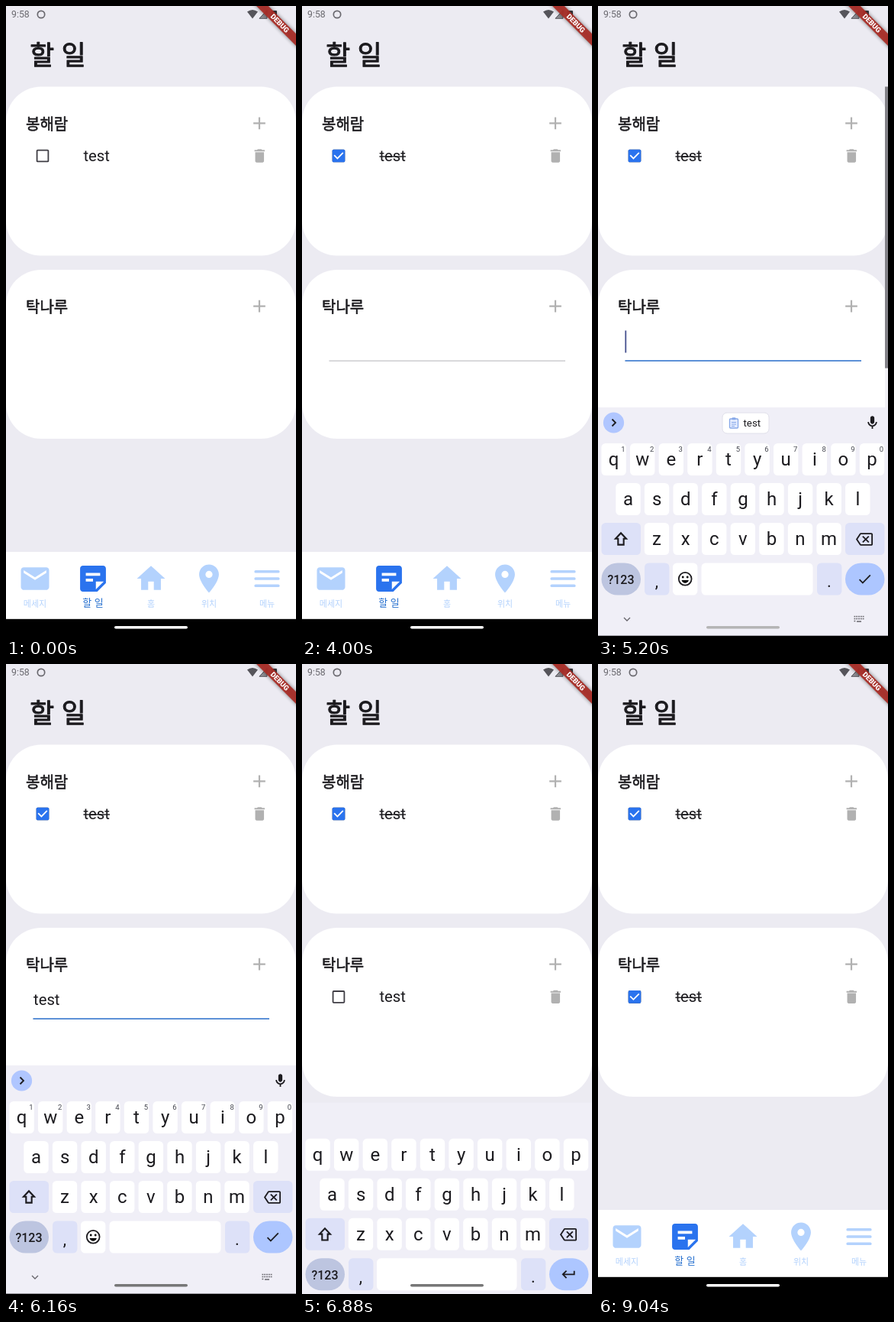
Write an HTML page that moves like this. It is 380 px wide and 824 px high and loops after 9.2 s.

```html
<!DOCTYPE html>
<html lang="ko">
<head>
<meta charset="utf-8">
<title>할 일</title>
<style>
  html, body { margin: 0; width: 100%; height: 100%; overflow: hidden; background: #ecebf2; }
  svg { display: block; width: 100%; height: 100%; }
  text { font-family: Roboto, sans-serif; fill: #1c1b1f; white-space: pre; }
  .ko { font-family: "Noto Sans CJK KR", "Noto Sans CJK", sans-serif; }
  .bold { stroke: #1c1b1f; stroke-width: .03em; stroke-linejoin: round; }
  .item { font-size: 20.3px; }
  .mid { text-anchor: middle; }
  .key { font-size: 24px; text-anchor: middle; }
  .hint { font-size: 9.5px; text-anchor: middle; fill: #44464f; }
</style>
</head>
<body>
<svg id="stage" viewBox="0 0 380 824"></svg>
<script>
const LOOP = 9200;
const CARD_STEP = 239.4;
const BLUE = '#2a73ee', PALE = '#b3d2fd', GREY = '#b1b1b1', INK = '#1c1b1f', STATUS = '#6a696f';

const ICONS = {
  mail: 'M20 4H4c-1.1 0-1.99.9-1.99 2L2 18c0 1.1.9 2 2 2h16c1.1 0 2-.9 2-2V6c0-1.1-.9-2-2-2zm0 4l-8 5-8-5V6l8 5 8-5v2z',
  note: 'M19 3H4.99C3.89 3 3 3.9 3 5l.01 14c0 1.1.89 2 1.99 2h10l6-6V5c0-1.1-.9-2-2-2zM7 8h10v2H7V8zm5 6H7v-2h5v2zm2 5.5V14h5.5L14 19.5z',
  home: 'M10 20v-6h4v6h5v-8h3L12 3 2 12h3v8z',
  place: 'M12 2C8.13 2 5 5.13 5 9c0 5.25 7 13 7 13s7-7.75 7-13c0-3.87-3.13-7-7-7zm0 9.5a2.5 2.5 0 0 1 0-5 2.5 2.5 0 0 1 0 5z',
  menu: 'M4 18h16a1 1 0 0 0 0-2H4a1 1 0 0 0 0 2zm0-5h16a1 1 0 0 0 0-2H4a1 1 0 0 0 0 2zM4 6a1 1 0 0 0 0 2h16a1 1 0 0 0 0-2z',
  add: 'M19 13h-6v6h-2v-6H5v-2h6V5h2v6h6v2z',
  trash: 'M6 19c0 1.1.9 2 2 2h8c1.1 0 2-.9 2-2V7H6v12zM19 4h-3.5l-1-1h-5l-1 1H5v2h14V4z',
  erase: 'M22 3H7c-.69 0-1.23.35-1.59.88L0 12l5.41 8.11c.36.53.9.89 1.59.89h15c1.1 0 2-.9 2-2V5c0-1.1-.9-2-2-2zm0 16H7.07L2.4 12l4.66-7H22v14zm-11.59-2L14 13.41 17.59 17 19 15.59 15.41 12 19 8.41 17.59 7 14 10.59 10.41 7 9 8.41 12.59 12 9 15.59z',
  enter: 'M19 7v4H5.83l3.58-3.59L8 6l-6 6 6 6 1.41-1.41L5.83 13H21V7z',
  done: 'M9 16.17L4.83 12l-1.42 1.41L9 19 21 7l-1.41-1.41z',
  mic: 'M12 14c1.66 0 3-1.34 3-3V5c0-1.66-1.34-3-3-3S9 3.34 9 5v6c0 1.66 1.34 3 3 3zm5-3c0 2.76-2.24 5-5 5s-5-2.24-5-5H5c0 3.53 2.61 6.43 6 6.92V21h2v-3.08c3.39-.49 6-3.39 6-6.92h-2z',
  shift: 'M12 3L3 12.5h4.5V20h9v-7.5H21zm0 2.9l4.4 4.6h-1.9V18h-5v-7.5H7.6z'
};

const icon = (name, x, y, scale, fill = INK) =>
  `<path d="${ICONS[name]}" fill="${fill}" transform="translate(${x} ${y}) scale(${scale}) translate(-12 -12)"/>`;
const rect = (x, y, w, h, fill, r = 0, extra = '') =>
  `<rect x="${x}" y="${y}" width="${w}" height="${h}" rx="${r}" fill="${fill}" ${extra}/>`;
const text = (str, x, y, cls, size, fill) =>
  `<text x="${x}" y="${y}" class="${cls}" style="${size ? `font-size:${size}px;` : ''}${fill ? `fill:${fill}` : ''}">${str}</text>`;
const line = (d, color, width, extra = '') =>
  `<path d="${d}" fill="none" stroke="${color}" stroke-width="${width}" ${extra}/>`;

const card = (name, i) => `<g transform="translate(0 ${i * CARD_STEP})">
  ${rect(0, 105.5, 380, 221, '#fff', 46)}
  ${text(name, 26, 161.6, 'ko bold', 20)}
  ${icon('add', 332, 153.3, 1.12, GREY)}
  <g id="row${i}">
    <g transform="translate(39.7 187.7)">
      ${rect(.9, .9, 14.8, 14.8, 'none', 1, 'stroke="#3f3d44" stroke-width="1.8"')}
      <g id="fill${i}">${rect(0, 0, 16.6, 16.6, BLUE, 1.6)}</g>
      ${line('M2.5 7.5L6.7 11.7L14.1 4.2', '#fff', 1.8, `id="tick${i}" pathLength="1"`)}
    </g>
    ${text('test', 101.4, 203, 'item')}
    ${rect(101.4, 196.2, 34.6, 1.4, INK, 0, `id="strike${i}"`)}
    ${icon('trash', 332.3, 196, .96, GREY)}
  </g>
</g>`;

const statusBar = `
  ${text('9:58', 7, 15.4, '', 12.3, STATUS)}
  <circle cx="46" cy="11" r="4.7" fill="none" stroke="${STATUS}" stroke-width="1.7"/>
  <path d="M323 16.5L316 7.6Q323 2.6 330 7.6Z" fill="#55545a"/>
  <path d="M332 16.3L342 5.6V16.3Z" fill="#8f8e94" stroke="#55545a"/>
  ${rect(347.5, 6, 7.5, 11, '#3b3b40', 1)}
  <g transform="translate(380 0) rotate(45)">
    ${rect(-60, 25.6, 120, 11.1, '#000', 0, 'opacity=".5" filter="url(#blur)"')}
    ${rect(-60, 25.6, 120, 11.1, '#ab2d27', 0, 'opacity=".92"')}
    <text x="1" y="34.2" class="mid" style="font-size:9.4px;font-weight:900;fill:#fff">DEBUG</text>
  </g>`;

const tabs = [['mail', '메세지'], ['note', '할 일'], ['home', '홈'], ['place', '위치'], ['menu', '메뉴']];
const navBar = rect(0, 714, 380, 88, '#fff') + rect(0, 801.8, 380, 22.2, '#000') +
  tabs.map(([name, label], i) => {
    const x = 38 + 76 * i, active = i === 1;
    return icon(name, x, 749, active ? 1.88 : 1.85, active ? BLUE : PALE) +
      text(label, x, active ? 784.8 : 785.6, 'ko mid', active ? 13 : 11, active ? '#2670cf' : PALE);
  }).join('');

const FUNC = '#dde1f8';
const PITCH = 37.6;
const letters = (row, firstX, top) => [...row].map((ch, i) => {
  const x = firstX + i * PITCH;
  return rect(x - 16.2, top, 32.4, 42, '#fff', 5.5) + text(ch, x, top + 29, 'key');
}).join('');
const hints = [...'1234567890'].map((d, i) => text(d, 33 + i * PITCH, 583, 'hint')).join('');

const keyboard = `<g id="keyboard">
  ${rect(0, 525, 380, 300, '#f0eff7')}
  <g id="toolbar">
    <circle cx="20.5" cy="545" r="13.6" fill="#b0c6ff"/>
    ${line('M18.5 540.5L23 545L18.5 549.5', INK, 1.8)}
    <g id="chip">
      ${rect(163, 532, 61, 27, '#fff', 6, 'stroke="#e0e0ea"')}
      ${rect(172.5, 540, 11, 12, '#e4ecff', 1, 'stroke="#86a8e8" stroke-width="1.3"')}
      ${rect(175.5, 538.3, 5, 3, '#86a8e8', 1)}
      ${line('M175 544.5h6M175 547h6M175 549.5h4', '#86a8e8', 1)}
      ${text('test', 190.5, 550.2, '', 13.3)}
    </g>
    ${icon('mic', 359.5, 545, .88)}
  </g>
  ${letters('qwertyuiop', 20.6, 572)}
  ${letters('asdfghjkl', 39.5, 624)}
  ${letters('zxcvbnm', 77, 676)}
  ${rect(4.5, 676, 51.5, 42, FUNC, 5.5)}${icon('shift', 30, 697.3, 1.05)}
  ${rect(324, 676, 51.5, 42, FUNC, 5.5)}${icon('erase', 349, 697.5, .92)}
  ${rect(4.5, 728.5, 51.5, 42, '#bdc5e0', 21)}
  <text x="30" y="756" class="mid" style="font-size:16px;font-weight:500">?123</text>
  ${rect(61, 728.5, 32.4, 42, FUNC, 5.5)}${text(',', 77, 760, 'key', 22)}
  ${rect(287, 728.5, 32.4, 42, FUNC, 5.5)}${text('.', 303, 760, 'key', 22)}
  ${rect(324, 728.5, 51.5, 42, '#adc6ff', 21)}
  <g id="editing">
    ${hints}
    ${rect(98, 728.5, 32.4, 42, '#fff', 5.5)}${rect(135.5, 728.5, 146, 42, '#fff', 5.5)}
    <circle cx="114.2" cy="749.3" r="8.4" fill="none" stroke="${INK}" stroke-width="1.8"/>
    <circle cx="111.2" cy="747" r="1.4"/><circle cx="117.2" cy="747" r="1.4"/>
    <path d="M109.5 751h9.4q-1.5 3.8-4.7 3.8t-4.7-3.8z"/>
    ${icon('done', 349.5, 749.5, .88)}
  </g>
  <g id="plain">
    ${rect(98, 728.5, 183.5, 42, '#fff', 5.5)}${icon('enter', 349.5, 749.5, .9)}
  </g>
  ${line('M34 800l4 4l4-4', '#66656b', 1.3)}
  ${line('M335.5 798.5h13M335.5 801.5h13M335.5 804.5h2', '#66656b', 1.7, 'stroke-dasharray="1.8 1"')}
  ${line('M339 805h6', '#66656b', 1.5)}
  ${rect(0, 823, 380, 1, '#98979d')}
</g>`;

document.getElementById('stage').innerHTML = `
  <defs><filter id="blur" x="-20%" y="-100%" width="140%" height="300%"><feGaussianBlur stdDeviation="2.4"/></filter></defs>
  ${rect(0, 0, 380, 824, '#ecebf2')}
  ${text('할 일', 31.2, 77.3, 'ko bold', 34.7)}
  ${card('봉해람', 0)}${card('탁나루', 1)}
  <g id="field">
    ${rect(35.5, 463.6, 309.5, 1, '#b4b3b8')}
    ${rect(35.5, 463.2, 309.5, 1.6, '#3f7fd6', 0, 'id="focusLine"')}
    ${text('<tspan id="typed">test</tspan>', 36, 446, 'item')}
    ${rect(35.4, 424.5, 1.8, 29, '#46518f', 0, 'id="cursor"')}
  </g>
  <g id="scrollbar">
    ${rect(376, 105.5, 4, 609, '#f1f0f5')}
    ${rect(376, 105.5, 4, 369, '#828187', 0, 'id="thumb"')}
  </g>
  ${statusBar}${navBar}${keyboard}
  ${rect(142, 811, 96, 3.6, '#fff', 1.8, 'id="pill"')}`;

const el = {};
document.querySelectorAll('[id]').forEach(node => el[node.id] = node);
const show = (node, visible) => node.style.display = visible ? '' : 'none';
const ramp = (t, from, to) => Math.min(1, Math.max(0, (t - from) / (to - from)));
const easeOut = p => 1 - (1 - p) ** 3;

const CHECKED = [1355, 8555];
const FIELD_SHOWN = 3350, FOCUSED = 4150, PASTED = 5650, SUBMITTED = 6550;

function drawCheck(i, t) {
  const p = ramp(t, CHECKED[i], CHECKED[i] + 200);
  const stroke = ramp(p, .5, 1);
  el['fill' + i].style.opacity = ramp(p, 0, .5);
  show(el['tick' + i], stroke > 0);
  el['tick' + i].setAttribute('stroke-dasharray', `${stroke} 2`);
  show(el['strike' + i], p > 0);
}

function draw(t) {
  drawCheck(0, t);
  drawCheck(1, t);
  show(el.row1, t >= SUBMITTED);

  const pasted = t >= PASTED;
  show(el.field, t >= FIELD_SHOWN && t < SUBMITTED);
  el.focusLine.style.opacity = ramp(t, FOCUSED, FOCUSED + 200);
  show(el.typed, pasted);
  const blink = (t - (pasted ? PASTED : FOCUSED)) % 1000;
  show(el.cursor, t >= FOCUSED && blink < 500);
  el.cursor.setAttribute('x', pasted ? 70 : 35.4);

  const raised = easeOut(ramp(t, 4520, 4880)) - ramp(t, 6760, 7060) ** 2;
  const shift = 300 * (1 - raised);
  el.keyboard.setAttribute('transform', `translate(0 ${shift})`);
  show(el.keyboard, raised > 0);
  const editing = t < 6640;
  show(el.editing, editing);
  show(el.plain, !editing);
  show(el.toolbar, editing);
  show(el.chip, !pasted);

  const viewport = 419.5 + shift, content = 478;
  show(el.scrollbar, t < 6000 && viewport < content);
  el.scrollbar.style.opacity = 1 - ramp(t, 5500, 5800);
  el.thumb.setAttribute('height', viewport * viewport / content);

  const tone = Math.round(255 - 74 * ramp(t, 4700, 5000) - 62 * ramp(t, 5250, 5550) + 136 * ramp(t, 7000, 7600));
  el.pill.setAttribute('fill', `rgb(${tone},${tone},${tone})`);
}

const start = performance.now();
function tick() {
  draw((performance.now() - start) % LOOP);
  requestAnimationFrame(tick);
}
tick();
</script>
</body>
</html>
```
